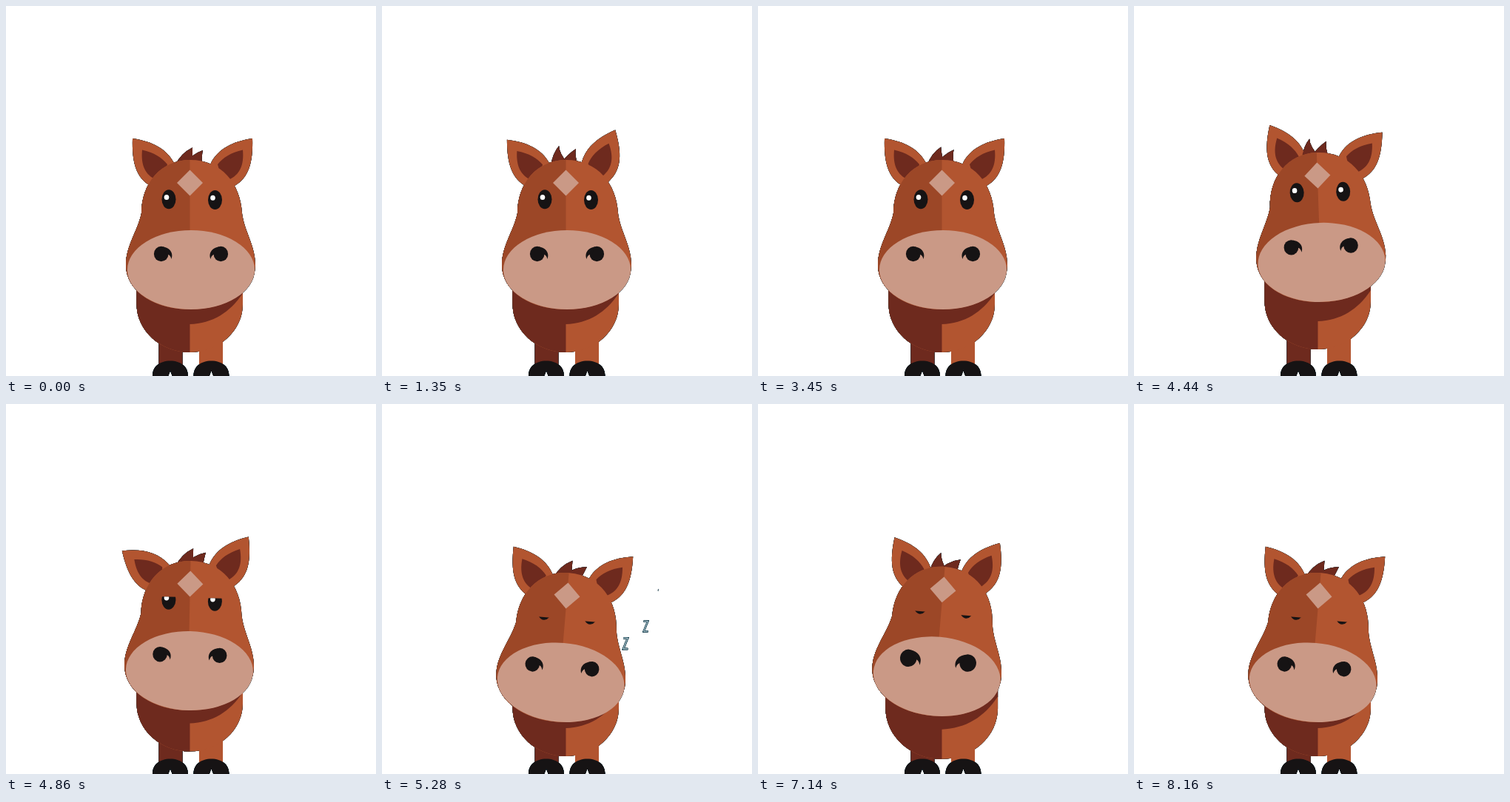
These frames come from a looping animation (500 by 500 pixels, 9000 ms). An HTML page with a canvas:

```html
<!DOCTYPE html>
<html>
<head>
<meta charset="utf-8">
<style>
html, body { margin: 0; width: 100%; height: 100%; overflow: hidden; background: #fff; }
canvas { display: block; filter: drop-shadow(0 0 .5px #0a2a35) drop-shadow(0 0 .3px #0a2a35); }
</style>
</head>
<body>
<canvas id="stage" width="500" height="500"></canvas>
<script>
const ctx = document.getElementById('stage').getContext('2d');
const LOOP = 9000;
const ORANGE = '#b25530', RUST = '#9c4727', BROWN = '#6e2a1e', PINK = '#ca9986', BLACK = '#161314';

const span = (t, from, to) => Math.min(1, Math.max(0, (t - from) / (to - from)));
const ease = (t, from, to) => (1 - Math.cos(Math.PI * span(t, from, to))) / 2;
const bump = (t, from, to) => Math.sin(Math.PI * span(t, from, to)) ** 2;
const sway = (t, from, to, turns) => Math.sin(2 * Math.PI * turns * span(t, from, to));

function poseAt(t) {
  const doze = ease(t, 4560, 5180);
  const lift = ease(t, 4080, 4500) * (1 - doze);
  const nod = sway(t, 4080, 5100, 1), sniff = sway(t, 6840, 7790, 1);
  const ruffle = bump(t, 360, 2220) + bump(t, 2220, 3150) + bump(t, 3150, 4080) / 2 +
    bump(t, 4080, 4900) + bump(t, 5280, 6840) / 2 + bump(t, 6840, 7700);
  const stretch = 20 * doze - 10.5 * lift;
  return {
    earL: -14 * sway(t, 370, 2290, 2) + 16 * nod + 6 * sniff,
    earR: 15 * sway(t, 360, 3150, 2) + 6 * nod - 12 * sniff,
    tuftA: 252 - 13 * ruffle,
    tuftB: 266 + 5 * bump(t, 1350, 3150) + 6 * doze - 4 * ruffle,
    flare: 1 + .2 * (bump(t, 360, 1250) + bump(t, 1950, 3050) + bump(t, 6840, 7750)),
    hoof: -11.4 * bump(t, 1800, 2750),
    headY: stretch + 2 * bump(t, 5940, 6840) - 11.5 * bump(t, 6840, 7790),
    headTurn: 4.8 * doze - 2.1 * lift,
    bodyY: .4 * stretch,
    breath: 1 + .06 * bump(t, 6500, 8000),
    lid: 245 + 25.5 * doze
  };
}

const shapes = {
  leg: 'M206.5 430H238.5V488H206.5Z',
  hoof: 'M198 500C198 487 208 479.5 222 479.5S246 487 246 500H224.7L222 493L219.3 500Z',
  body: 'M176.5 365H320V403A71.75 65 0 0 1 176.5 403Z',
  bodyLeft: 'M176.5 365H248.5V468A72 65 0 0 1 176.5 403Z',
  shade: 'M248 365H320V388C303 414 279 429 248 430Z',
  ear: 'M171 179C198 183 217 193 227 212L235 240L212 254L195 243C176 232 170 212 171 179Z',
  earInner: 'M184 194.5C200 198 211 205 218 214L210 243L203 235C188 228 182 215 184 194.5Z',
  head: 'M249 208C209 208 183 240 183 280C178 304 162 324 162 350C162 385 200 410 249 410' +
    'C299 410 337 385 337 350C337 324 322 304 319 280C317 240 291 208 249 208Z',
  headLeft: 'M248.5 208C209 208 183 240 183 280C178 304 162 324 162 350C162 385 200 410 248.5 410Z',
  diamond: 'M248.5 221.5L266 239L248.5 256.5L231 239Z',
  nostrilTail: 'M212 325.5C220 326 227 333 223.5 342C222.5 338 221 335.5 216 335Z',
  zed: 'M-3 -7.3H3L-3 7.3H3.2'
};
for (const name in shapes) shapes[name] = new Path2D(shapes[name]);

function fill(shape, color) {
  ctx.fillStyle = color;
  ctx.fill(shapes[shape] || new Path2D(shape));
}

function oval(x, y, rx, ry, color) {
  ctx.beginPath();
  ctx.ellipse(x, y, rx, ry, 0, 0, 7);
  ctx.fillStyle = color;
  ctx.fill();
}

function group(draw) {
  ctx.save();
  draw();
  ctx.restore();
}

function mirror(width) {
  ctx.translate(width, 0);
  ctx.scale(-1, 1);
}

function turn(x, y, degrees, dy = 0) {
  ctx.translate(x, y + dy);
  ctx.rotate(degrees * Math.PI / 180);
  ctx.translate(-x, -y);
}

function grow(x, y, scale) {
  ctx.translate(x, y);
  ctx.scale(scale, scale);
  ctx.translate(-x, -y);
}

function leg(color) {
  fill('leg', color);
  fill('hoof', BLACK);
}

function ear(degrees) {
  turn(225, 243, degrees);
  fill('ear', ORANGE);
  fill('earInner', BROWN);
}

function nostril(scale) {
  grow(210, 335, scale);
  oval(209.7, 335, 9.8, 10.2, BLACK);
  fill('nostrilTail', BLACK);
}

function eye(x, y, lid) {
  ctx.beginPath();
  ctx.rect(x - 12, lid, 24, 40);
  ctx.clip();
  oval(x, y, 9.5, 13, BLACK);
  oval(x - 3, y - 2.8, 3.3, 3.5, '#fff');
}

function mane(a, b) {
  const rise = 190 + (a - 245) / 6;
  fill(`M228 216Q${233 + (a - 245) * .4} 199 ${a} ${rise}Q${a} 199 252 214Z`, BROWN);
  fill(`M238 216Q251 200 ${b} ${195 + (b - 266) * .5}Q${b - 2} 203 265 215Z`, BROWN);
}

function head(pose) {
  turn(249, 257, pose.headTurn, pose.headY);
  group(() => ear(pose.earL));
  group(() => { mirror(504); ear(-pose.earR); });
  mane(pose.tuftA, pose.tuftB);
  fill('head', ORANGE);
  fill('headLeft', RUST);
  fill('diamond', PINK);
  group(() => eye(220, 261.3, pose.lid));
  group(() => eye(282.5, 262, pose.lid + .7));
  oval(250, 356.5, 86, 53.5, PINK);
  group(() => nostril(pose.flare));
  group(() => { mirror(500); nostril(pose.flare); });
}

// Three letters pop up one after another and float away
function snore(age) {
  [[324.5, 347], [354, 313], [373, 253]].forEach(([x, y], i) => {
    const a = age - i * 105, p = a / 600;
    if (p <= 0 || p >= 1) return;
    const size = Math.min(1, a / 130, (1 - p) / .2);
    group(() => {
      ctx.translate(x + 12 * p, y - 62 * p);
      ctx.scale(size, size);
      for (const [color, width] of [['#2c5a6b', 2.4], ['#d5e2e6', .9]]) {
        ctx.strokeStyle = color;
        ctx.lineWidth = width;
        ctx.stroke(shapes.zed);
      }
    });
  });
}

function draw(t) {
  const pose = poseAt(t);
  ctx.clearRect(0, 0, 500, 500);
  group(() => leg(BROWN));
  group(() => {
    ctx.translate(0, pose.hoof);
    mirror(499.5);
    leg(ORANGE);
  });
  group(() => {
    ctx.translate(0, pose.bodyY);
    grow(248.5, 400, pose.breath);
    fill('body', ORANGE);
    fill('shade', BROWN);
    fill('bodyLeft', BROWN);
  });
  group(() => head(pose));
  snore(t - 5055);
  snore(t - 7340);
}

const start = performance.now();
function tick() {
  draw((performance.now() - start) % LOOP);
  requestAnimationFrame(tick);
}
tick();
</script>
</body>
</html>
```
